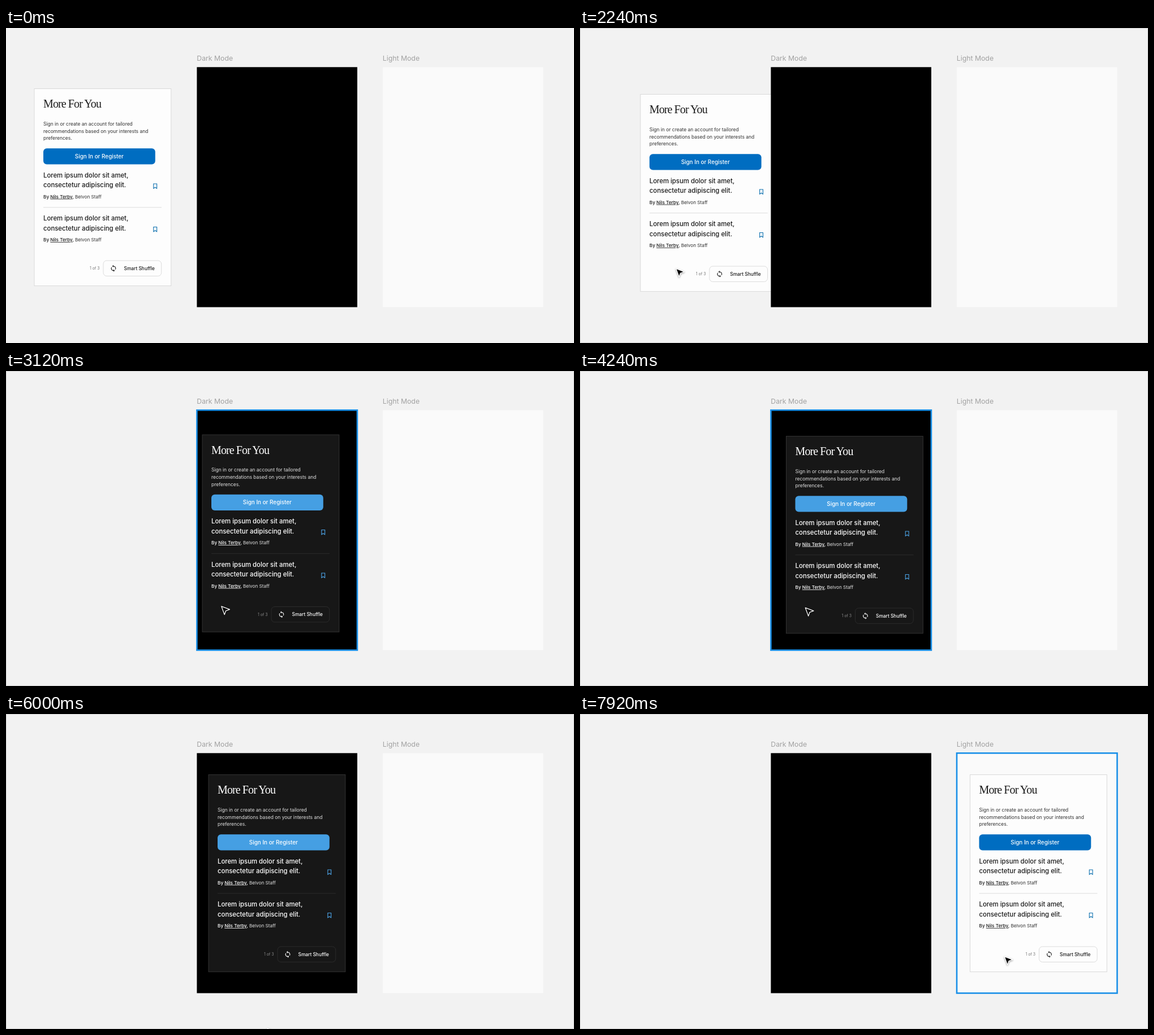
These frames come from a looping animation (1004x558 px, 8 s). An HTML page:

```html
<!DOCTYPE html>
<html lang="en">
<head>
<meta charset="utf-8">
<title>Dark and light mode card</title>
<style>
html, body { margin: 0; width: 100%; height: 100%; overflow: hidden; background: #f2f2f2; }
svg { display: block; width: 1004px; height: 558px; font-family: Inter, "Open Sans", sans-serif; }
.label { font-size: 12.27px; fill: #a2a2a2; }
.light { --bg: #fdfdfd; --edge: #d9d9d9; --line: #dcdcdc; --ink: #1b1b1b; --soft: #303030; --dim: #757575; --accent: #006dc1; --mark: #0b6fae; }
.dark { --bg: #171717; --edge: #333; --line: #2b2b2b; --ink: #fff; --soft: #e2e2e2; --dim: #8c8c8c; --accent: #459fe3; --mark: #4ba3e6; }
.card text { fill: var(--ink); }
.card .title { font: 20px "Liberation Serif", "Noto Serif", serif; letter-spacing: -.9px; }
.card .body { font-size: 8.46px; fill: var(--soft); }
.card .action { font-size: 9.9px; font-weight: 500; fill: #fff; text-anchor: middle; }
.card .head { font-size: 11.35px; font-weight: 500; }
.card .by { font-size: 8.2px; font-weight: 500; }
.card .by .staff { font-weight: 400; fill: var(--soft); }
.card .by .name { text-decoration: underline; }
.card .count { font-size: 6.9px; fill: var(--dim); }
.card .shuffle { font-size: 8.35px; font-weight: 500; }
.panel { fill: var(--bg); stroke: var(--edge); }
.rule { stroke: var(--line); }
.outlined { fill: none; stroke: var(--line); }
.mark { fill: none; stroke: var(--mark); stroke-width: 1.1; }
.arc { fill: none; stroke: var(--ink); stroke-width: 1.1; }
.outline { fill: none; stroke: #188fe8; stroke-width: 2.6; }
#cursor { filter: drop-shadow(0 1px 1.4px rgba(0, 0, 0, .4)); }
</style>
</head>
<body>
<svg viewBox="0 0 1004 558">
  <defs>
    <rect id="frame" y="69.3" width="283.5" height="425.2"/>
    <clipPath id="darkClip"><use href="#frame" x="337.4"/></clipPath>
    <clipPath id="lightClip"><use href="#frame" x="666"/></clipPath>
    <g id="half">
      <path class="arc" d="M0 -3.85A3.85 3.85 0 0 1 3.3 2"/>
      <path fill="var(--ink)" d="M0 -6V-1.7L-2.2 -3.85z"/>
    </g>
  </defs>
  <rect width="1004" height="558" fill="#f2f2f2"/>
  <rect id="edge" x=".5" y=".5" width="1003" height="557" fill="none" stroke="#d3d3d3"/>
  <text class="label" x="337.3" y="58.3">Dark Mode</text>
  <text class="label" x="665.8" y="58.3">Light Mode</text>
  <g id="canvasLayer">
    <g id="card" class="card light">
      <rect class="panel" x=".5" y=".5" width="241.8" height="349.2"/>
      <text class="title" x="16.5" y="34">More For You</text>
      <g id="intro"></g>
      <rect x="16.5" y="106.2" width="197.8" height="28.2" rx="6" fill="var(--accent)"/>
      <text class="action" x="115.4" y="123.7">Sign In or Register</text>
      <g id="stories"></g>
      <path class="rule" d="M16.5 210.8h209"/>
      <text class="count" x="98.5" y="321">1 of 3</text>
      <rect class="outlined" x="122.5" y="305" width="102.7" height="27.4" rx="6"/>
      <g transform="translate(140.5 318.8)">
        <use href="#half"/>
        <use href="#half" transform="rotate(180)"/>
      </g>
      <text class="shuffle" x="159" y="321.7">Smart Shuffle</text>
    </g>
  </g>
  <use href="#frame" x="337.4" fill="#000"/>
  <use href="#frame" x="666" fill="#fafafa"/>
  <g id="darkLayer" clip-path="url(#darkClip)"></g>
  <g id="lightLayer" clip-path="url(#lightClip)"></g>
  <use id="darkOutline" class="outline" href="#frame" x="337.4"/>
  <use id="lightOutline" class="outline" href="#frame" x="666"/>
  <g id="cursor">
    <path d="M.8 .8L15.4 6.4L8.6 8.8L6.2 15.6z" stroke="#fff" stroke-width="1.3" stroke-linejoin="round"/>
  </g>
</svg>
<script>
const LOOP = 8000, STEP = 80, LAG = 80;
const el = id => document.getElementById(id);
const card = el("card"), cursor = el("cursor");

const intro = [
  "Sign in or create an account for tailored",
  "recommendations based on your interests and",
  "preferences."
];
el("intro").innerHTML = intro.map((line, i) =>
  `<text class="body" x="16.5" y="${65.8 + i * 12.75}">${line}</text>`).join("");

const story = y => `<g transform="translate(0 ${y})">
  <text class="head" x="16.5" y="157.8">Lorem ipsum dolor sit amet,</text>
  <text class="head" x="16.5" y="175">consectetur adipiscing elit.</text>
  <path class="mark" d="M211.3 169h5.8v8.2l-2.9-2l-2.9 2z"/>
  <text class="by" x="16.5" y="194.6">By <tspan class="name">Nils Terby</tspan>, <tspan class="staff">Belvon Staff</tspan></text>
</g>`;
el("stories").innerHTML = story(0) + story(76.5);

const smooth = u => u * u * (3 - 2 * u);
const speedUp = u => u * u;
const fling = u => u ** 3;
const glide = u => 1 - (1 - u) ** 5;

// A point that eases to a new place during each leg and rests in between.
function journey(x, y) {
  const legs = [];
  const at = t => legs.reduce((p, leg) => {
    const u = leg.ease(Math.min(1, Math.max(0, (t - leg.from) / (leg.till - leg.from))));
    return { x: p.x + (leg.x - p.x) * u, y: p.y + (leg.y - p.y) * u };
  }, { x, y });
  const to = (x, y, from, till, ease = smooth) => {
    legs.push({ x, y, from, till, ease });
    return { to, at };
  };
  return { to, at };
}

const cardMotion = journey(49.5, 107)
  .to(106.3, 117, 1760, 2240, speedUp)
  .to(346.5, 112.5, 2240, 3120, glide)
  .to(364, 115, 3120, 4160)
  .to(357.5, 107, 4240, 4640)
  .to(424, 116, 7040, 7440, speedUp)
  .to(689, 107, 7440, 7920, fling);

// Cursor position relative to the card, which it trails by LAG.
const grip = journey(110, 350)
  .to(80, 311.5, 640, 1600)
  .to(33.5, 303.5, 2320, 3120)
  .to(103.5, 449.3, 4960, 5840)
  .to(112, 331.5, 6160, 6880)
  .to(172, 318, 7440, 7920);

const place = (node, p) => node.setAttribute("transform", `translate(${p.x} ${p.y})`);
const show = (node, on) => node.setAttribute("visibility", on ? "visible" : "hidden");

function layerAt(t) {
  if (t >= 7840) return "light";
  return t >= 2320 && t < 7680 ? "dark" : "canvas";
}

function render(time) {
  const t = Math.floor(time % LOOP / STEP) * STEP;
  const layer = layerAt(t), parent = el(layer + "Layer");
  if (card.parentNode !== parent) parent.appendChild(card);
  card.setAttribute("class", "card " + (layer === "dark" ? "dark" : "light"));
  place(card, cardMotion.at(t));
  const held = cardMotion.at(t - LAG), offset = grip.at(t);
  place(cursor, { x: held.x + offset.x, y: held.y + offset.y });
  show(cursor, t >= 640);
  show(el("edge"), t >= 400);
  show(el("darkOutline"), t >= 2400 && t < 5120);
  show(el("lightOutline"), t >= 7920);
}

const start = performance.now();
function tick() {
  render(performance.now() - start);
  requestAnimationFrame(tick);
}
tick();
</script>
</body>
</html>
```
